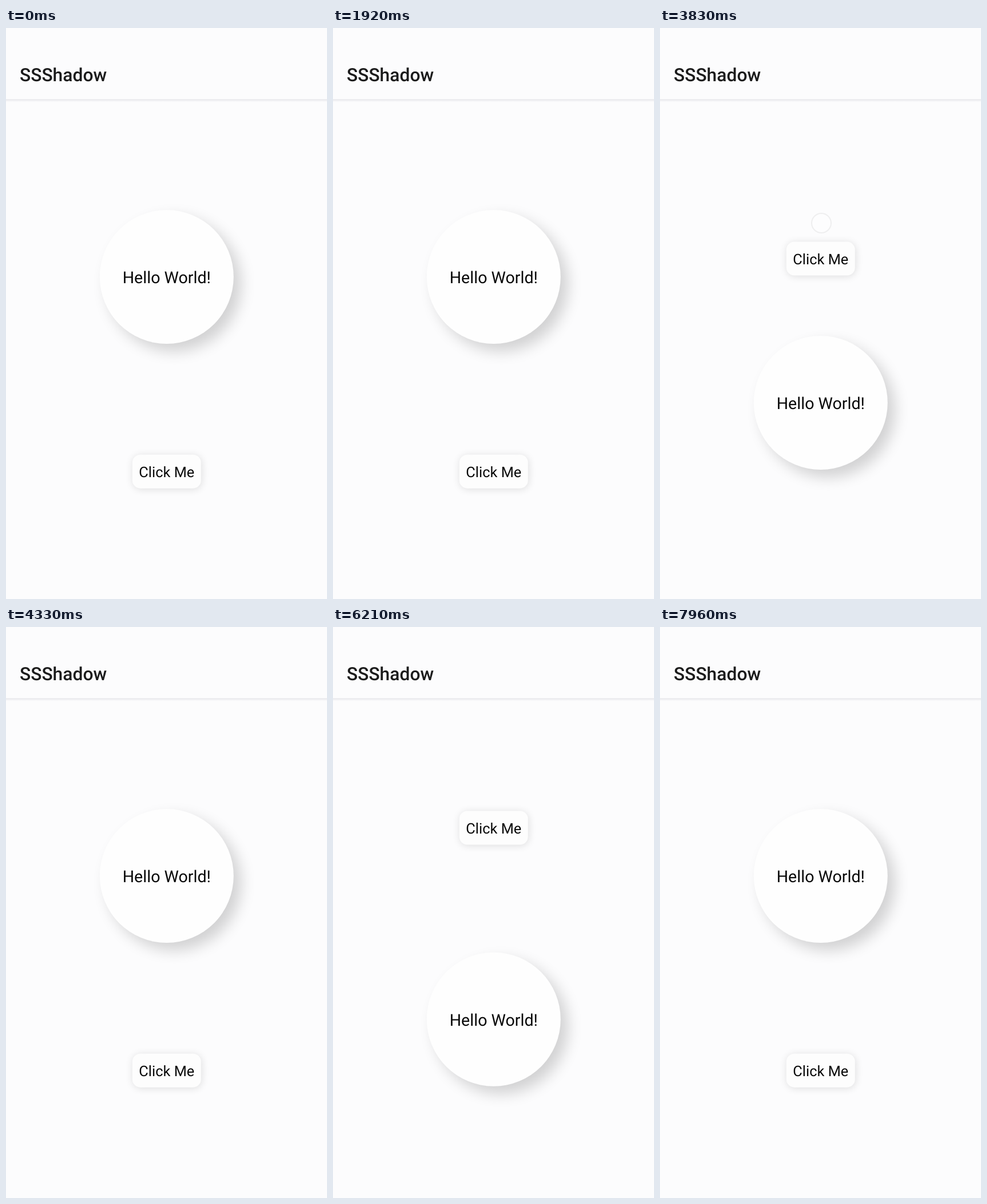
These frames come from a looping animation (561x998 px, 8 s). An HTML page:

```html
<!DOCTYPE html>
<html lang="en">
<head>
<meta charset="utf-8">
<title>SSShadow</title>
<style>
  html, body { margin: 0; width: 100%; height: 100%; overflow: hidden; background: #fcfcfd; }
  svg { display: block; width: 100vw; height: 100vh; }
  text { font-family: Roboto, sans-serif; fill: #080808; text-rendering: geometricPrecision; }
  .label { text-anchor: middle; }
</style>
</head>
<body>
<svg viewBox="0 0 561 998">
  <defs>
    <filter id="wide" x="-50%" y="-50%" width="200%" height="200%"><feGaussianBlur stdDeviation="13"/></filter>
    <filter id="narrow" x="-50%" y="-80%" width="200%" height="260%"><feGaussianBlur stdDeviation="7"/></filter>
    <linearGradient id="barShadow" x1="0" y1="0" x2="0" y2="1">
      <stop offset="0" stop-color="#dedee3"/>
      <stop offset=".35" stop-color="#f0f0f3"/>
      <stop offset="1" stop-color="#fcfcfd"/>
    </linearGradient>
  </defs>
  <rect width="561" height="998" fill="#fcfcfd"/>
  <rect y="124.7" width="561" height="5" fill="url(#barShadow)"/>
  <text x="24" y="93" font-size="31.8" font-weight="500" style="fill:#1c1c1c">SSShadow</text>

  <g id="disc">
    <circle cx="13" cy="13" r="117" opacity=".17" filter="url(#wide)"/>
    <circle r="117" fill="#fefefe"/>
    <text class="label" y="11" font-size="28.6">Hello World!</text>
  </g>
  <g id="button">
    <rect x="-59" y="-28" width="120" height="59" rx="14" opacity=".12" filter="url(#narrow)"/>
    <rect x="-60" y="-29.5" width="120" height="59" rx="14" fill="#fdfdfd"/>
    <text class="label" y="10" font-size="25.4">Click Me</text>
  </g>
  <circle id="touch" r="17" fill="#fff" fill-opacity=".5" stroke="#000" stroke-opacity=".13" stroke-width="2"/>
</svg>
<script>
  const LOOP = 8000, STEP = 1000 / 24, MOVE = 300, PRESS = 110, FADE = 120;
  const CENTER = 280.8;

  // Each tap swaps the disc and the button.
  const taps = [
    { at: 2264, x: 283, y: 775, strength: 0.7 },
    { at: 3765, x: 282, y: 341, strength: 1 },
    { at: 5200, x: 287, y: 774, strength: 0.4 },
    { at: 6562, x: 284, y: 350, strength: 0.7 }
  ];

  const disc = document.getElementById("disc");
  const button = document.getElementById("button");
  const touch = document.getElementById("touch");

  const clamp = v => Math.min(1, Math.max(0, v));
  const ease = p => (1 - Math.cos(Math.PI * clamp(p))) / 2;
  const mix = (a, b, p) => a + (b - a) * p;
  const place = (node, x, y) => node.setAttribute("transform", `translate(${x} ${y})`);

  function render(time) {
    let swap = 0, opacity = 0;
    taps.forEach((tap, i) => {
      const age = time - tap.at;
      swap += (i % 2 ? -1 : 1) * ease(age / MOVE);
      if (age > -PRESS && age < FADE) {
        opacity = tap.strength * clamp(1 - age / FADE);
        place(touch, tap.x, tap.y);
      }
    });
    place(disc, CENTER, mix(435, 685.7, swap));
    place(button, CENTER, mix(775.2, 351, swap));
    touch.setAttribute("opacity", opacity);
  }

  const start = performance.now();
  function tick() {
    const time = (performance.now() - start) % LOOP;
    render(Math.floor((time + 4) / STEP) * STEP);
    requestAnimationFrame(tick);
  }
  tick();
</script>
</body>
</html>
```
